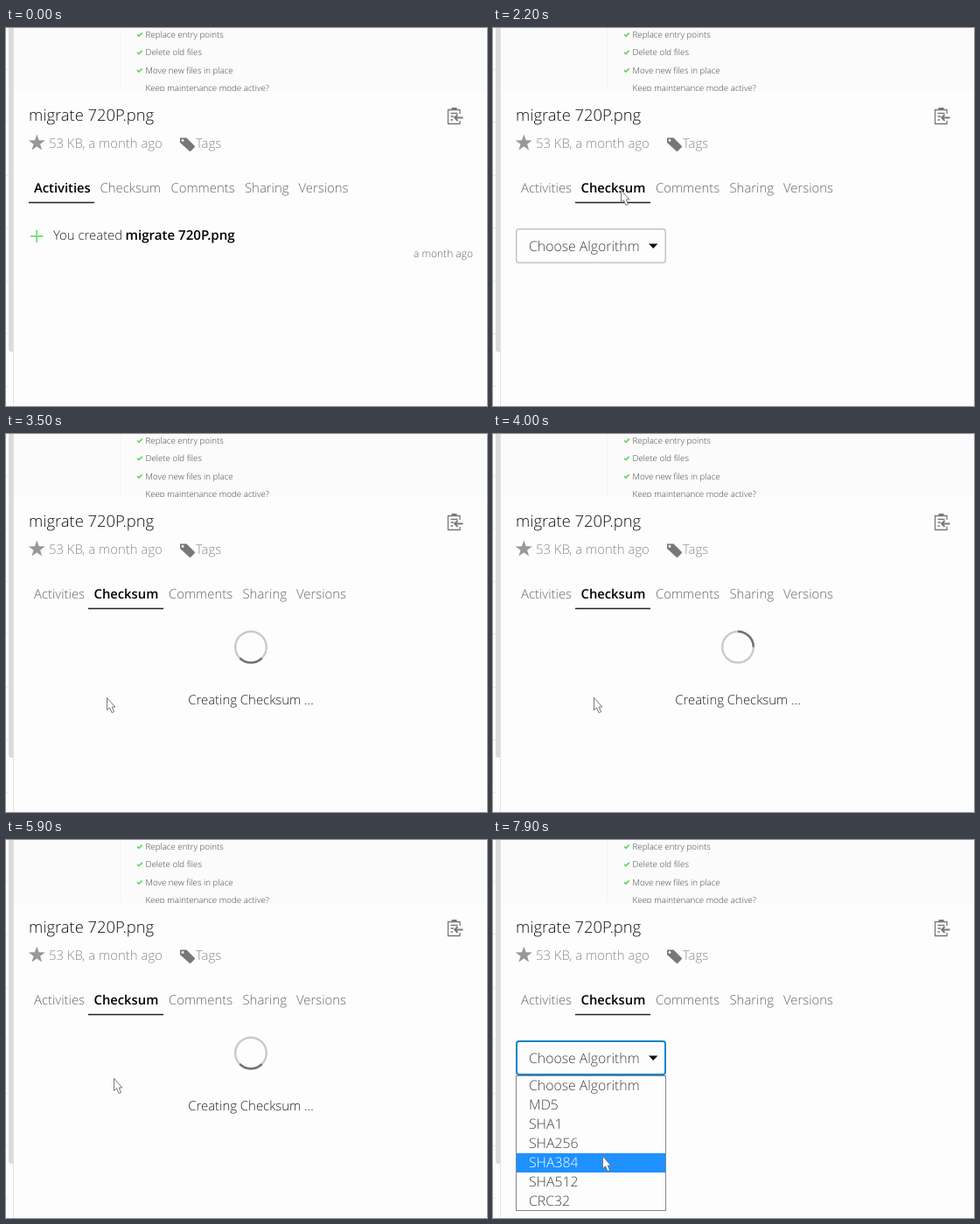
Recreate the animation shown at these times as an HTML page. Size 550 px wide and 432 px high, loop 8000 ms.

```html
<!DOCTYPE html>
<html lang="en">
<head>
<meta charset="utf-8">
<title>Checksum panel</title>
<style>
html, body { margin: 0; width: 100%; height: 100%; overflow: hidden; background: #fefdfe; }
svg { display: block; width: 550px; height: 432px; }
text { font: 300 14.9px "Open Sans", sans-serif; fill: #222; white-space: pre; text-rendering: geometricPrecision; }
.bold { font-weight: 600; font-size: 15.1px; fill: #000; }
.title { font-size: 18.4px; fill: #111; }
.meta { fill: #8a8a8a; }
.date { font-size: 12px; fill: #666; }
.shot text { font-size: 9.75px; fill: #444; }
.tab { fill: #666; }
.tab.selected { font-weight: 600; font-size: 14.8px; fill: #000; }
.tab.hover { fill: #222; }
.field { font-size: 15.8px; fill: #444; }
.mid { text-anchor: middle; }
</style>
</head>
<body>
<svg viewBox="0 0 550 432">
  <defs>
    <clipPath id="shotClip"><rect x="9" width="541" height="72"/></clipPath>
    <filter id="shadow" x="-20%" y="-30%" width="140%" height="180%">
      <feDropShadow dx="0" dy="1" stdDeviation="2.5" flood-color="#000" flood-opacity=".4"/>
    </filter>
  </defs>

  <path d="M0 47.5h3M0 107.5h3M0 168.5h3M0 228.5h3M0 289.5h3M0 349.5h3M0 409.5h3" stroke="#e8e8e8"/>
  <path d="M3 0H8V370H6Q3 370 3 366Z" fill="#dcdbdc"/>
  <path d="M8.5 0V432" stroke="#e2e2e2"/>

  <g class="shot" id="shot" clip-path="url(#shotClip)">
    <rect x="9" width="541" height="72" fill="#fcfbfc"/>
    <path d="M130.5 0V72" stroke="#f3f3f3"/>
  </g>

  <text class="title" x="26" y="106">migrate 720P.png</text>
  <path id="star" fill="#989898"/>
  <text class="meta" x="49" y="137">53 KB, a month ago</text>
  <path d="M199 125.500h7.500l9 9q1 1 0 2l-4 4q-1 1-2 0l-10.500-9.500z" fill="#777"/>
  <circle cx="202" cy="128.500" r="1.400" fill="#fefdfe"/>
  <text class="meta" x="217" y="137">Tags</text>
  <g fill="none" stroke="#777" stroke-width="1.300">
    <path d="M519 98V93.500H505.500V109.500H519V106M508.500 97.500H516.500M508.500 101H512M508.500 105H511"/>
    <path d="M509.500 92.500h6" stroke-width="3"/>
    <path d="M522.500 102.500H513M516.500 99l-3.500 3.500 3.500 3.500" stroke-width="1.800"/>
  </g>

  <g id="tabs"></g>
  <path id="underline" stroke="#222" stroke-width="1.300"/>
  <path id="hoverLine" d="M101 199.500H182" stroke="#222" stroke-width="1.300"/>

  <g id="activity">
    <path d="M28 238H42.500M35.200 231V245" stroke="#7be07b" stroke-width="2"/>
    <text x="54" y="242">You created</text>
    <text class="bold" x="136.500" y="242">migrate 720P.png</text>
    <text class="date" x="534" y="262" text-anchor="end">a month ago</text>
  </g>
  <g id="tooltip">
    <rect x="163" y="262" width="74.500" height="34" rx="3" fill="#fefdfe" filter="url(#shadow)"/>
    <path d="M188 264L200 254L212 264Z" fill="#fefdfe"/>
    <text class="mid" x="200.500" y="285" style="font-size:14.600px">in Public</text>
  </g>

  <g id="chooser">
    <rect id="field" rx="3" fill="#fefdfe"/>
    <text class="field" x="41" y="255">Choose Algorithm</text>
    <path d="M178 246.500H188.500L183.200 252Z" fill="#111"/>
  </g>
  <g id="menu">
    <rect x="26.500" y="269.500" width="171" height="154" fill="#fefdfe" stroke="#7f8790"/>
    <rect id="highlight" x="27" width="170" height="22" fill="#1e90ff"/>
  </g>

  <g id="loading">
    <circle cx="280" cy="243.500" r="17.800" fill="none" stroke="#cacaca" stroke-width="2.400"/>
    <path id="arc" d="M267.400 230.900A17.800 17.800 0 0 1 292.600 230.900" fill="none" stroke="#707070" stroke-width="2.400"/>
    <text class="mid" x="280" y="309">Creating Checksum ...</text>
  </g>
  <g id="result">
    <text class="mid" x="280" y="243">MD5: 7c1e50b94fa2d83660e9b7152d48ca3f</text>
    <path d="M274 279A8 8 0 1 1 272.500 288M273 274V280H279M280 279.500V285H284" fill="none" stroke="#777" stroke-width="1.800"/>
  </g>

  <path id="cursor" d="M.5 .5V14.500L3.500 11.800L6 17.500L8.500 16.500L6.200 11H9.800Z" fill="#fff" stroke="#777"/>
</svg>
<script>
const LOOP = 8000, STEP = 100;
const $ = id => document.getElementById(id);

function add(parent, tag, attrs, text = "") {
  const node = document.createElementNS("http://www.w3.org/2000/svg", tag);
  for (const key in attrs) node.setAttribute(key, attrs[key]);
  node.textContent = text;
  return parent.appendChild(node);
}

["Replace entry points", "Delete old files", "Move new files in place", "Keep maintenance mode active?"]
  .forEach((label, i) => {
    const y = 11 + i * 20.3;
    add($("shot"), "text", { x: 159.5, y }, label);
    if (i < 3) add($("shot"), "path", {
      d: `M150 ${y - 3.5}l1.900 1.900 3.800-3.800`, fill: "none", stroke: "#55d855", "stroke-width": 1.6
    });
  });

const starPoints = Array.from({ length: 10 }, (_, i) => {
  const r = i % 2 ? 4 : 10, a = i * Math.PI / 5;
  return `${35.3 + r * Math.sin(a)} ${131.5 - r * Math.cos(a)}`;
});
$("star").setAttribute("d", `M${starPoints.join("L")}Z`);

const tabs = ["Activities", "Checksum", "Comments", "Sharing", "Versions"]
  .map(label => add($("tabs"), "text", { class: "tab", y: 188 }, label));
const tabX = [[32, 107.5, 188.5, 273, 334.5], [32, 100.5, 186, 270.5, 332]];

const options = ["Choose Algorithm", "MD5", "SHA1", "SHA256", "SHA384", "SHA512", "CRC32"]
  .map((label, i) => add($("menu"), "text", { class: "field", x: 41, y: 286 + i * 22 }, label));

// Pointer path: time, x, y
const path = [
  [800, 347, 411], [1100, 254, 310], [1300, 180, 238], [1400, 162, 221], [1600, 153, 186], [1700, 146, 185],
  [2500, 146, 185], [3000, 146, 245], [3100, 146, 248], [3400, 115, 301], [4000, 115, 301], [4300, 115, 286],
  [5200, 118, 276], [5900, 123, 272], [6000, 117, 272], [6200, 117, 272], [6800, 289, 279],
  [7000, 289, 279], [7500, 150, 248], [7700, 146, 250], [7800, 140, 263], [7900, 125, 361]
];

function pointerAt(t) {
  const i = path.findIndex(p => p[0] > t);
  if (i < 0) return path.at(-1).slice(1);
  const [t0, x0, y0] = path[Math.max(0, i - 1)], [t1, x1, y1] = path[i];
  const k = t1 > t0 ? (t - t0) / (t1 - t0) : 0;
  return [x0 + (x1 - x0) * k, y0 + (y1 - y0) * k];
}

const show = (id, on) => $(id).style.display = on ? "" : "none";
const within = (t, from, to) => t >= from && t < to;

function setAttrs(id, attrs) {
  for (const key in attrs) $(id).setAttribute(key, attrs[key]);
}

function draw(t) {
  const selected = t < 2200 ? 0 : 1;
  const hover = within(t, 1600, 2200);
  tabs.forEach((tab, i) => {
    tab.setAttribute("x", tabX[selected][i]);
    tab.setAttribute("class", "tab" + (i === selected ? " selected" : hover && i === 1 ? " hover" : ""));
  });
  $("underline").setAttribute("d", selected ? "M94 199.500H180" : "M26 199.500H101");

  show("hoverLine", hover);
  show("activity", !selected);
  show("tooltip", within(t, 1300, 1600));
  show("chooser", within(t, 2200, 3500) || t >= 7000);
  show("loading", within(t, 3500, 6000));
  show("result", within(t, 6000, 7000));

  const focused = within(t, 3000, 3500) || t >= 7500;
  setAttrs("field", focused
    ? { x: 27, y: 230, width: 170, height: 38, stroke: "#1583c4", "stroke-width": 2 }
    : { x: 26.75, y: 229.75, width: 170.5, height: 38.5, stroke: "#c4c4c4", "stroke-width": 1.5 });

  const [x, y] = pointerAt(t);
  const row = Math.max(0, Math.floor((y - 270) / 22));
  show("menu", within(t, 3100, 3500) || t >= 7600);
  $("highlight").setAttribute("y", 270 + row * 22);
  options.forEach((option, i) => option.style.fill = i === row ? "#fff" : "");

  $("arc").setAttribute("transform", `rotate(${45 + (t - 4000) / 800 * 360} 280 243.500)`);
  show("cursor", t >= 800);
  $("cursor").setAttribute("transform", `translate(${x} ${y})`);
}

function tick() {
  draw(Math.floor(performance.now() % LOOP / STEP) * STEP);
  requestAnimationFrame(tick);
}
tick();
</script>
</body>
</html>
```
